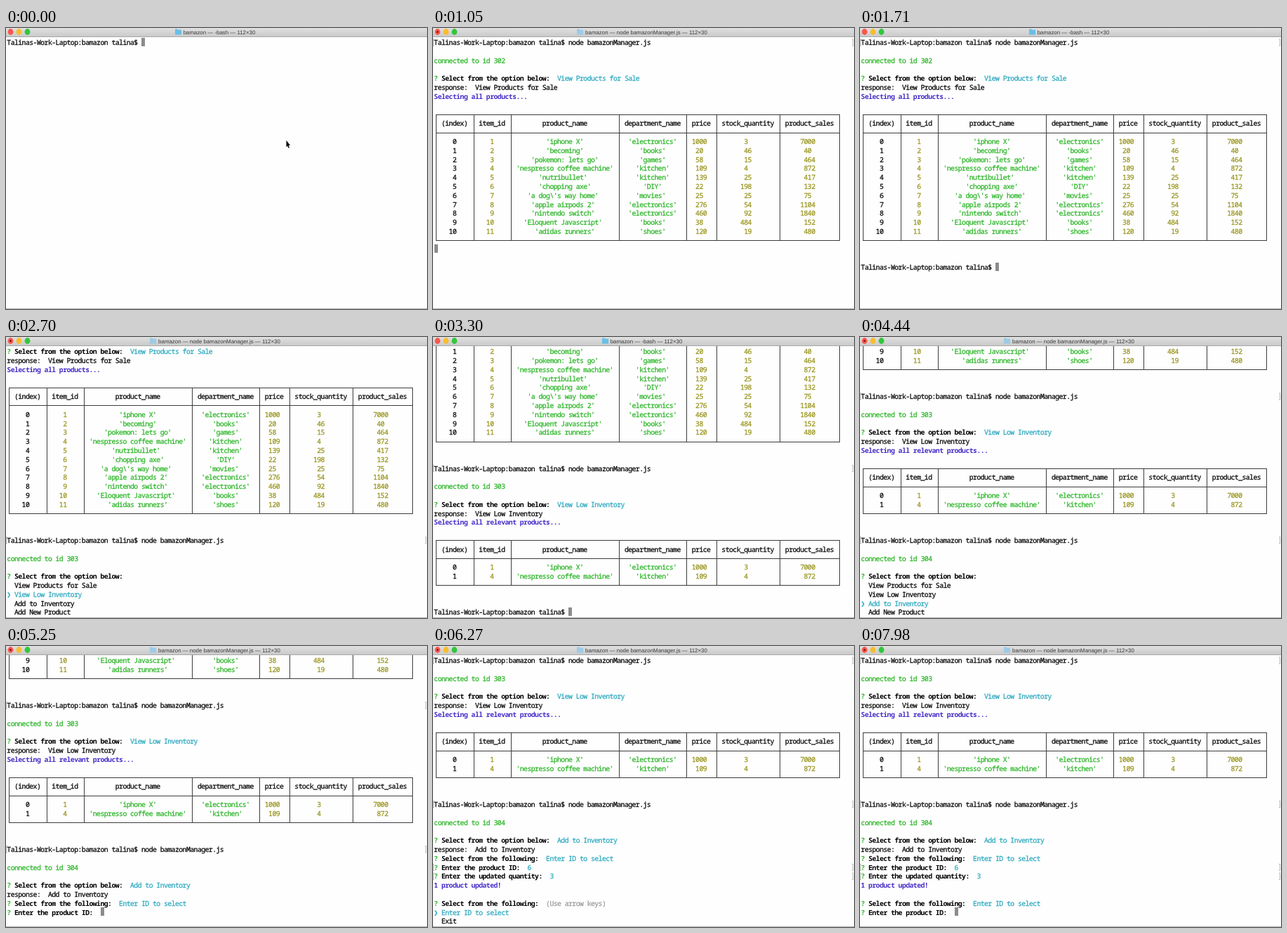
An HTML page with a canvas that plays this animation: 600 px wide and 400 px high, repeating every 8 s.

```html
<!DOCTYPE html>
<html lang="en">
<head>
<meta charset="utf-8">
<title>Terminal session</title>
<style>
  html, body { margin: 0; width: 100%; height: 100%; overflow: hidden; background: #fefefe; }
  canvas { display: block; }
</style>
</head>
<body>
<canvas id="stage" width="600" height="400"></canvas>
<script>
const ctx = document.getElementById('stage').getContext('2d');
const LOOP = 8000, ROWS = 30;
const CELL_W = 5.325, CELL_H = 12.8, LEFT = 1.6, TOP = 13.6;
const MONO = '9.8px "Noto Sans Mono", "DejaVu Sans Mono", monospace';

// Text styles: [colour, weight]
const STYLES = {
  plain: ['#0c0c0c', 500],
  bold: ['#000', 700],
  green: ['#2fb62b', 500],
  mark: ['#2fb62b', 700],
  teal: ['#2faabf', 500],
  yellow: ['#9b9722', 500],
  purple: ['#4630c8', 700],
  hint: ['#9c9c9c', 500],
};

// Arms of each box-drawing character: left, right, up, down
const BOX = {
  '─': 'lr', '│': 'ud', '┌': 'rd', '┬': 'lrd', '┐': 'ld', '├': 'rud',
  '┼': 'lrud', '┤': 'lud', '└': 'ru', '┴': 'lru', '┘': 'lu',
};

// Rows are lists of [style, text] segments
const PROMPT = 'Talinas-Work-Laptop:bamazon talina$ ';
const BLANK = [];
const line = (style, text) => [[style, text]];
const prompt = line('plain', PROMPT);
const command = line('plain', PROMPT + 'node bamazonManager.js');
const connected = id => line('green', 'connected to id ' + id);
const response = text => line('plain', 'response:  ' + text);
const ask = (question, answer = '', style = 'teal') =>
  [['mark', '? '], ['bold', question], ['plain', '  '], [style, answer]];
const entered = row => Object.assign([...row], { entered: true });

const menu = (question, options, selected, hint = false) => [
  ask(question, hint ? '(Use arrow keys)' : '', 'hint'),
  ...options.map((text, i) => i === selected ? line('teal', '❯ ' + text) : line('plain', '  ' + text)),
];

const PRODUCTS = [
  ['iphone X', 'electronics', 1000, 3, 7000],
  ['becoming', 'books', 20, 46, 40],
  ['pokemon: lets go', 'games', 58, 15, 464],
  ['nespresso coffee machine', 'kitchen', 109, 4, 872],
  ['nutribullet', 'kitchen', 139, 25, 417],
  ['chopping axe', 'DIY', 22, 198, 132],
  ["a dog\\'s way home", 'movies', 25, 25, 75],
  ['apple airpods 2', 'electronics', 276, 54, 1104],
  ['nintendo switch', 'electronics', 460, 92, 1840],
  ['Eloquent Javascript', 'books', 38, 484, 152],
  ['adidas runners', 'shoes', 120, 19, 480],
].map((fields, i) => [i + 1, ...fields]);
const HEADERS = ['(index)', 'item_id', 'product_name', 'department_name', 'price', 'stock_quantity', 'product_sales'];

function table(items) {
  const quote = v => typeof v === 'string' ? `'${v}'` : String(v);
  const body = items.map((item, i) => [String(i), ...item.map(quote)]);
  const widths = HEADERS.map((h, c) => Math.max(h.length, ...body.map(r => r[c].length)) + 2);
  const rule = ([left, mid, right]) =>
    line('plain', left + widths.map(w => '─'.repeat(w)).join(mid) + right);
  const center = (text, w) => {
    const pad = Math.floor((w - text.length) / 2);
    return (' '.repeat(pad) + text).padEnd(w);
  };
  const cells = (texts, styleOf) => [['plain', '│'],
    ...texts.flatMap((text, c) => [[styleOf(text, c), center(text, widths[c])], ['plain', '│']])];
  const valueStyle = (text, c) => c === 0 ? 'plain' : text[0] === "'" ? 'green' : 'yellow';
  return [
    rule('┌┬┐'), cells(HEADERS, () => 'plain'), rule('├┼┤'),
    ...body.map(texts => cells(texts, valueStyle)), rule('└┴┘'),
  ];
}

// Each event replaces everything from one line of the scrollback onward
const events = [];
const show = (time, from, rows, cursor = true) => events.push({ time, from, rows, cursor });
const showMenu = (time, from, ...args) => show(time, from, menu(...args), false);

const MAIN = 'Select from the option below:', NEXT = 'Select from the following:';
const ACTIONS = ['View Products for Sale', 'View Low Inventory', 'Add to Inventory', 'Add New Product'];
const CHOICES = ['Enter ID to select', 'Exit'];
const ID = 'Enter the product ID:', QUANTITY = 'Enter the updated quantity:';

function start(typed, enter, ready, from, id) {
  show(typed, from, [command]);
  show(enter, from, [entered(command), BLANK]);
  show(ready, from + 1, [BLANK, connected(id), BLANK]);
  showMenu(ready + 30, from + 4, MAIN, ACTIONS, 0, true);
}
function list(time, from, action, message, items) {
  show(time, from, [ask(MAIN, action), response(action), line('purple', message), BLANK]);
  show(time + 120, from + 3, [BLANK, ...table(items), BLANK]);
  show(time + 300, from + items.length + 8, [BLANK, BLANK, prompt]);
}

show(0, 0, [prompt]);
start(60, 120, 240, 0, 302);
list(840, 4, ACTIONS[0], 'Selecting all products...', PRODUCTS);

start(1830, 1950, 2160, 25, 303);
showMenu(2550, 29, MAIN, ACTIONS, 1);
list(2850, 29, ACTIONS[1], 'Selecting all relevant products...', PRODUCTS.filter(p => p[4] < 5));

start(3600, 3810, 3960, 41, 304);
showMenu(4260, 45, MAIN, ACTIONS, 1);
showMenu(4410, 45, MAIN, ACTIONS, 2);
show(4650, 45, [ask(MAIN, ACTIONS[2]), response(ACTIONS[2]), ...menu(NEXT, CHOICES, 0, true)], false);
show(4980, 47, [ask(NEXT, CHOICES[0]), ask(ID)]);
show(5400, 48, [ask(ID, '6', 'plain')]);
show(5550, 48, [entered(ask(ID, '6')), ask(QUANTITY)]);
show(5640, 49, [ask(QUANTITY, '3', 'plain')]);
show(5820, 49, [entered(ask(QUANTITY, '3')), BLANK]);
show(5940, 50, [line('purple', '1 product updated!'), BLANK]);
showMenu(6000, 52, NEXT, CHOICES, 0, true);
show(7590, 52, [ask(NEXT, CHOICES[0]), ask(ID)]);

const isRunning = t => (t >= 600 && t < 1470) || (t >= 2430 && t < 3300) || t >= 3780;

function rect(color, x, y, w, h) {
  ctx.fillStyle = color;
  ctx.fillRect(x, y, w, h);
}

function dot(color, x, y, rx, ry) {
  ctx.fillStyle = color;
  ctx.beginPath();
  ctx.ellipse(x, y, rx, ry, 0, 0, 7);
  ctx.fill();
}

function drawBox(arms, x, y) {
  const cx = Math.round(x + CELL_W / 2), cy = Math.floor(y + CELL_H / 2 + 1);
  const has = arm => arms.includes(arm);
  const left = has('l') ? Math.floor(x) : cx, right = has('r') ? Math.ceil(x + CELL_W) : cx + 1;
  const up = has('u') ? Math.floor(y) : cy, down = has('d') ? Math.ceil(y + CELL_H) : cy + 1;
  rect('#3c3c3c', left, cy, right - left, 1);
  rect('#3c3c3c', cx, up, 1, down - up);
}

function drawRow(row, y) {
  let col = 0;
  ctx.lineWidth = 0.3;
  for (const [style, text] of row) {
    const [color, weight] = STYLES[style];
    ctx.font = `${weight} ${MONO}`;
    for (const char of text) {
      const x = LEFT + col++ * CELL_W;
      if (BOX[char]) drawBox(BOX[char], x, y);
      else if (char !== ' ') {
        ctx.fillStyle = ctx.strokeStyle = color;
        ctx.fillText(char, x + CELL_W / 2, y + 10.5);
        if (weight < 700) ctx.strokeText(char, x + CELL_W / 2, y + 10.5);
      }
    }
  }
  if (row.entered) {
    for (const [edge, tip] of [[0, 0], [598, 597]]) {
      rect('#bdbdbd', edge, y + 2, 1, 10);
      rect('#bdbdbd', tip, y + 2, 2, 1);
      rect('#bdbdbd', tip, y + 11, 2, 1);
    }
  }
  return col;
}

function drawTerminal(t) {
  const lines = [];
  let top = 0, cursor = true;
  for (const e of events) {
    if (e.time > t) break;
    lines.splice(e.from, Infinity, ...e.rows);
    top = Math.max(top, lines.length - ROWS);
    cursor = e.cursor;
  }
  lines.slice(top).forEach((row, i, visible) => {
    const y = TOP + i * CELL_H;
    const col = drawRow(row, y);
    if (cursor && i === visible.length - 1) {
      rect('#8c8c8c', Math.round(LEFT + col * CELL_W), Math.round(y), 5, 12);
    }
  });
}

function drawTitleBar(running) {
  const shade = ctx.createLinearGradient(0, 0, 0, 12);
  shade.addColorStop(0, '#e0e0e0');
  shade.addColorStop(1, '#cacaca');
  rect(shade, 0, 0, 600, 12);
  rect('#a8a8a8', 0, 12, 600, 1);
  ['#f9574d', '#f8bd2e', '#32c63e'].forEach((color, i) => dot(color, 6.5 + i * 12, 5.5, 3.9, 4.4));
  if (running) dot('#7c1410', 6.5, 5.5, 1.3, 1.5);
  const title = `bamazon — ${running ? 'node bamazonManager.js' : '-bash'} — 112×30`;
  ctx.font = '7.9px "Liberation Sans", Arial, sans-serif';
  ctx.fillStyle = '#3a3a3a';
  ctx.fillText(title, 304, 8.6);
  const x = Math.round(304 - ctx.measureText(title).width / 2 - 12);
  const folder = running ? '#9ccbe6' : '#6abfe6';
  rect(folder, x, 1.5, 4, 2);
  rect(folder, x, 2.5, 9, 7);
}

function drawPointer() {
  ctx.beginPath();
  [[399.5, 160], [399.5, 169.5], [401.3, 167.8], [402.7, 171], [404, 170.3], [402.7, 167.2], [405, 167]]
    .forEach(([x, y]) => ctx.lineTo(x, y));
  ctx.closePath();
  ctx.strokeStyle = '#fff';
  ctx.lineWidth = 1;
  ctx.stroke();
  ctx.fillStyle = '#000';
  ctx.fill();
}

function draw(now) {
  const t = now % LOOP;
  ctx.textAlign = 'center';
  ctx.lineJoin = 'round';
  ctx.textRendering = 'geometricPrecision';
  rect('#fefefe', 0, 0, 600, 400);
  drawTerminal(t);
  drawTitleBar(isRunning(t));
  rect('#b4b4b4', 0, 399, 600, 1);
  if (t < 60) drawPointer();
  requestAnimationFrame(draw);
}
requestAnimationFrame(draw);
</script>
</body>
</html>
```
